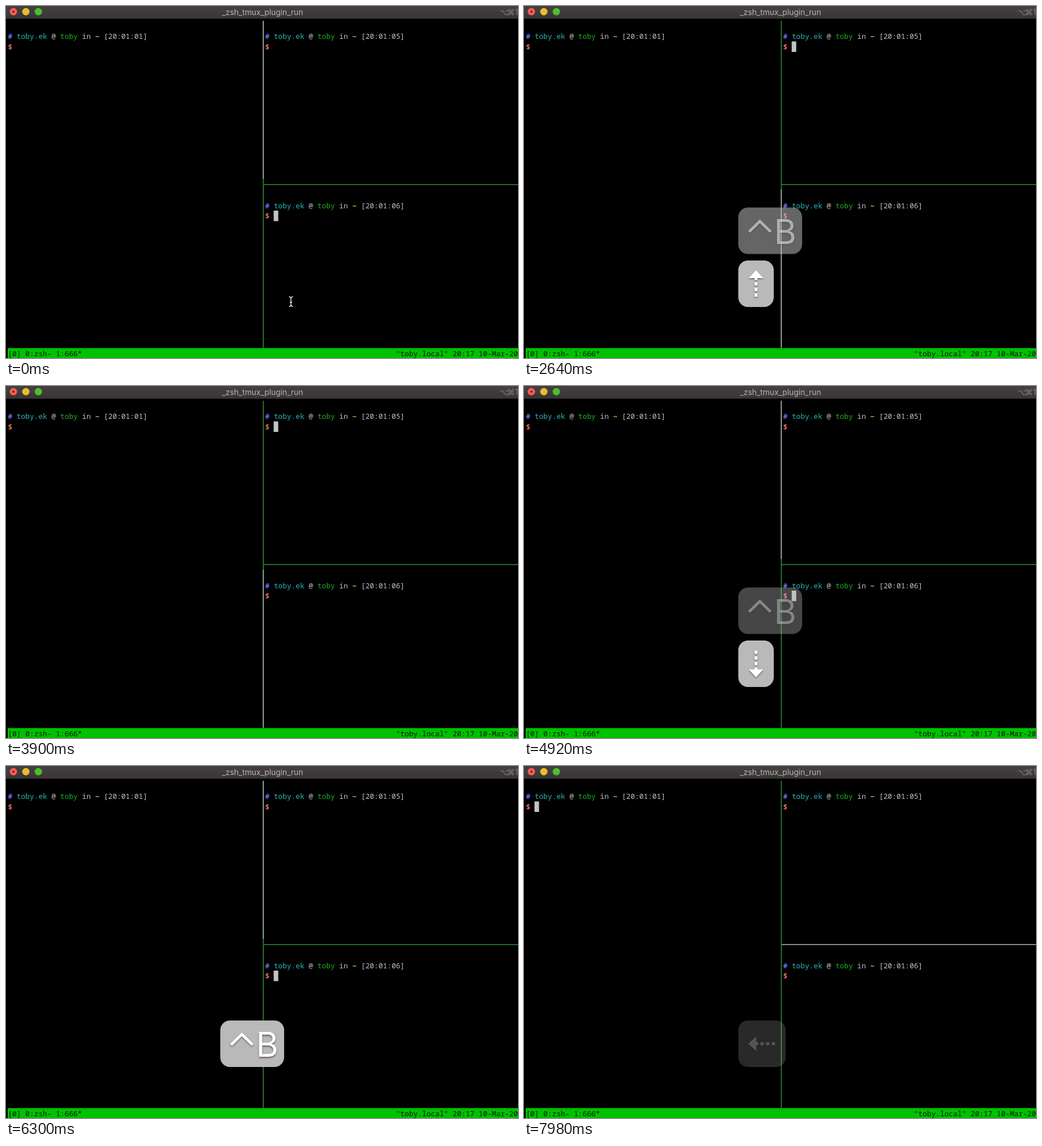
An HTML page with a canvas that plays this animation: 902x621 px, repeating every 8000 ms.

```html
<!DOCTYPE html>
<html lang="en">
<head>
<meta charset="utf-8">
<title>Terminal panes</title>
<style>
  html, body { margin: 0; width: 100%; height: 100%; overflow: hidden; background: #000; }
  canvas { display: block; width: 902px; height: 621px; }
</style>
</head>
<body>
<canvas id="stage" width="902" height="621"></canvas>
<script>
const ctx = document.getElementById('stage').getContext('2d');
const LOOP = 8000, STEP = 60;
const HOLD = 500, FADE = 500;
const CELL = 7.68, LEFT = 3.4;
const MONO = '12.8px "Noto Sans Mono", "DejaVu Sans Mono", monospace';
const GREY = '#c4c4c4', LINE = '#2f9e38';

// Key presses: time, label, and when the next key pushes it up.
const keys = [
  { at: 1915, label: '^B', raised: 2410 },
  { at: 2410, label: 'up' },
  { at: 4110, label: '^B', raised: 4640 },
  { at: 4640, label: 'down' },
  { at: 6160, label: '^B', raised: 7090 },
  { at: 7090, label: 'left' }
];
const badgeWidth = { '^B': 112.5, up: 62.5, down: 62.5, left: 83.5 };
const turn = { up: 0, down: Math.PI, left: -Math.PI / 2 };

function rect(x, y, w, h, color) {
  ctx.fillStyle = color;
  ctx.fillRect(x, y, w, h);
}

function disc(x, y, r, color) {
  ctx.fillStyle = color;
  ctx.beginPath();
  ctx.arc(x, y, r, 0, Math.PI * 2);
  ctx.fill();
}

// Writes one character per terminal cell.
function cells(col, y, text, color, bold) {
  ctx.font = (bold ? 'bold ' : '') + MONO;
  ctx.fillStyle = color;
  [...text].forEach((c, i) => ctx.fillText(c, LEFT + (col + i) * CELL, y));
}

function titleBar() {
  const g = ctx.createLinearGradient(0, 0, 0, 22);
  g.addColorStop(0, '#454140');
  g.addColorStop(1, '#393635');
  rect(0, 0, 902, 22, g);
  rect(0, 22, 902, 1, '#191817');
  disc(13, 10, 6.5, '#fb5d56');
  disc(13, 10, 2, '#8c1a14');
  disc(35, 10, 6.5, '#e6bd30');
  disc(57, 10, 6.5, '#4bc02b');

  ctx.font = '13.8px Inter, "Liberation Sans", sans-serif';
  ctx.fillStyle = '#b5b2b1';
  ctx.textAlign = 'center';
  ctx.fillText('_zsh_tmux_plugin_run', 452, 15.5);
  ctx.textAlign = 'left';
  ctx.font = '14px "DejaVu Sans", sans-serif';
  ctx.fillStyle = '#827f7d';
  ctx.fillText('⌥', 869.5, 15.5);
  ctx.fillText('⌘', 882.5, 15.5);
  ctx.font = '14px Inter, sans-serif';
  ctx.fillText('1', 896.5, 15.5);
}

function prompt(col, y, clock, active) {
  cells(col, y, '#', '#6871ff', true);
  cells(col + 2, y, 'toby.ek', '#2bb5b8');
  cells(col + 10, y, '@', GREY);
  cells(col + 12, y, 'toby', '#20b020');
  cells(col + 17, y, 'in', GREY);
  cells(col + 20, y, '~', '#f4f45f', true);
  cells(col + 22, y, '[' + clock + ']', GREY);
  cells(col, y + 18.5, '$', '#ff6d67', true);
  if (active) rect(LEFT + (col + 2) * CELL - 0.3, y + 4.5, 8, 18.5, GREY);
}

function borders(active) {
  const x = 452.6, w = 1.4;
  rect(x, 26, w, 577, LINE);
  if (active === 'bottom') rect(x, 26, w, 279, GREY);
  if (active === 'top') rect(x, 324, w, 279, GREY);
  rect(454, 314.3, 448, 1.4, active === 'left' ? GREY : LINE);
}

function statusBar() {
  rect(3, 603.5, 899, 18, '#00c200');
  cells(0, 617.5, '[0] 0:zsh- 1:666*', '#061506');
  cells(89, 617.5, '"toby.local" 20:17 10-Mar-20', '#061506');
}

function mouse() {
  ctx.strokeStyle = '#e8e8e8';
  ctx.lineWidth = 1.5;
  ctx.beginPath();
  ctx.moveTo(498.5, 513);
  ctx.quadraticCurveTo(502, 513, 502, 516);
  ctx.lineTo(502, 527);
  ctx.quadraticCurveTo(502, 530, 498.5, 530);
  ctx.moveTo(505.5, 513);
  ctx.quadraticCurveTo(502, 513, 502, 516);
  ctx.moveTo(502, 527);
  ctx.quadraticCurveTo(502, 530, 505.5, 530);
  ctx.moveTo(500, 522.5);
  ctx.lineTo(504, 522.5);
  ctx.stroke();
}

function arrow(x, y, angle) {
  ctx.translate(x, y);
  ctx.rotate(angle);
  ctx.beginPath();
  ctx.moveTo(0, -24);
  ctx.lineTo(12.8, -10);
  ctx.lineTo(2.5, -10);
  ctx.lineTo(2.5, -6.5);
  ctx.lineTo(-2.5, -6.5);
  ctx.lineTo(-2.5, -10);
  ctx.lineTo(-12.8, -10);
  ctx.closePath();
  for (let i = 0; i < 3; i++) ctx.rect(-2.5, -2.8 + i * 10, 5, 5.8);
  ctx.fill();
}

function control(x, y) {
  ctx.lineWidth = 5;
  ctx.beginPath();
  ctx.moveTo(x + 19, y + 43);
  ctx.lineTo(x + 38, y + 24.5);
  ctx.lineTo(x + 57, y + 43);
  ctx.stroke();
  ctx.font = '60px Inter, "Liberation Sans", sans-serif';
  ctx.fillText('B', x + 63, y + 64);
}

function badge(key, t) {
  const age = t - key.at;
  if (age < 0 || age >= HOLD + FADE) return;
  const x = 377.5, y = t >= key.raised ? 355.5 : 449;
  const w = badgeWidth[key.label];
  ctx.save();
  ctx.globalAlpha = Math.min(1, 1 - (age - HOLD) / FADE);
  ctx.fillStyle = '#b9b9b9';
  ctx.beginPath();
  ctx.roundRect(x, y, w, 82, 17);
  ctx.fill();
  ctx.fillStyle = ctx.strokeStyle = '#fff';
  ctx.shadowColor = 'rgba(0,0,0,.5)';
  ctx.shadowBlur = 3;
  ctx.shadowOffsetY = 1.5;
  if (key.label === '^B') control(x, y);
  else arrow(x + w / 2, y + 41, turn[key.label]);
  ctx.restore();
}

function draw(t) {
  const active = t >= 7090 ? 'left' : t >= 2410 && t < 4640 ? 'top' : 'bottom';
  rect(0, 0, 902, 621, '#000');
  titleBar();
  borders(active);
  prompt(0, 58, '20:01:01', active === 'left');
  prompt(59, 58, '20:01:05', active === 'top');
  prompt(59, 356.5, '20:01:06', active === 'bottom');
  statusBar();
  if (t < keys[0].at) mouse();
  keys.forEach(key => badge(key, t));
}

const start = performance.now();
function tick() {
  const t = (performance.now() - start) % LOOP;
  draw(Math.floor(t / STEP) * STEP);
  requestAnimationFrame(tick);
}
tick();
</script>
</body>
</html>
```
